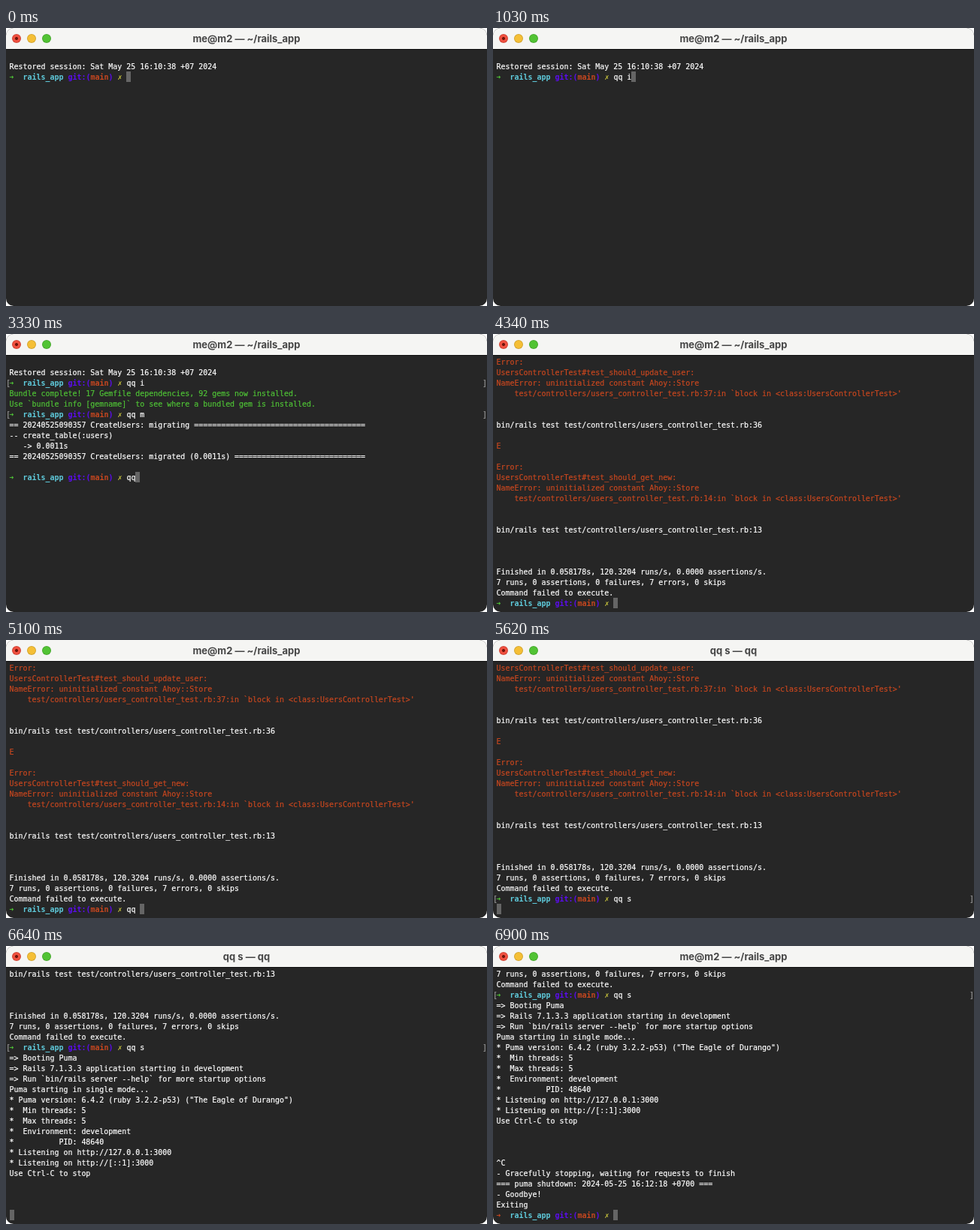
Recreate the animation shown at these times as an HTML page. Size 640 by 371 pixels, loop 7.16 s.

```html
<!DOCTYPE html>
<html lang="en">
<head>
<meta charset="utf-8">
<title>Terminal</title>
<style>
  html, body { margin: 0; width: 100%; height: 100%; overflow: hidden; background: #fff; }
  .window {
    position: relative; width: 640px; height: 371px; overflow: hidden;
    border-radius: 10px; background: #262626;
  }
  .bar {
    position: absolute; inset: 0 0 auto; height: 28px;
    background: #f5f5f3; border-bottom: 1px solid #0c0c0c;
  }
  .title {
    font: 700 13px/28px Inter, sans-serif; color: #454545;
    text-align: center; white-space: pre;
  }
  .light {
    position: absolute; top: 8px; width: 12px; height: 12px; box-sizing: border-box;
    border: 1px solid rgba(0, 0, 0, .13); border-radius: 50%;
  }
  .close { left: 8px; background: radial-gradient(circle, #70150c 1.6px, #f0503f 2.4px); }
  .min { left: 28px; background: #f5bf36; }
  .max { left: 48px; background: #52c334; }
  .screen {
    position: absolute; left: 4.5px; top: 30px; width: 630.5px; height: 336px;
    font: 9.966px/16px "DejaVu Sans Mono", monospace; color: #fff; white-space: pre;
    -webkit-text-stroke: .2px;
  }
  .row { position: relative; height: 14px; }
  .ran::before, .ran::after { position: absolute; top: 0; color: #999; }
  .ran::before { content: "["; left: -4.5px; }
  .ran::after { content: "]"; right: -5px; }
  .cursor {
    display: inline-block; width: 6px; height: 14px;
    background: #656565; vertical-align: top;
  }
  b { -webkit-text-stroke: 0; }
  b i { display: inline-block; width: 6px; font-style: normal; }
  .green { color: #4fc236; }
  .red { color: #c8471f; }
  .cyan { color: #5fcbdc; }
  .blue { color: #5c0cf0; }
  .yellow { color: #c9c53c; }
</style>
</head>
<body>
<div class="window">
  <div class="bar">
    <span class="light close"></span><span class="light min"></span><span class="light max"></span>
    <div class="title"></div>
  </div>
  <div class="screen"></div>
</div>
<script>
const LOOP = 7160, ROWS = 24, HOME = "me@m2 — ~/rails_app";
const titleEl = document.querySelector(".title");
const screenEl = document.querySelector(".screen");

const states = [];
const lines = [];
let title = HOME, input = "";

const span = (color, text) => `<span class="${color}">${text}</span>`;
const row = (html, cls = "") => `<div class="row ${cls}">${html}</div>`;
const escapeHtml = s => s.replace(/&/g, "&amp;").replace(/</g, "&lt;");

function print(text, color = "") {
  for (const line of text.split("\n")) lines.push(row(span(color, escapeHtml(line))));
}

function prompt(arrow = "green") {
  title = HOME;
  input = `<b>${span(arrow, "<i>➜</i>")}  ${span("cyan", "rails_app")} ${span("blue", "git:(")}` +
    `${span("red", "main")}${span("blue", ")")} ${span("yellow", "<i>✗</i>")}</b> `;
}

// Store what the screen shows from time t on
function show(t, typed = "") {
  const all = [...lines, row(input + typed + '<span class="cursor"></span>')];
  states.push({ t, title, html: all.slice(-ROWS).join("") });
}

function type(...keys) {
  for (const [t, typed] of keys) show(t, typed);
}

function run(t, cmd) {
  lines.push(row(input + cmd, "ran"));
  input = "";
  title = cmd + " — qq";
  show(t);
}

function testError(name, line) {
  print(`Error:
UsersControllerTest#${name}:
NameError: uninitialized constant Ahoy::Store
    test/controllers/users_controller_test.rb:${line}:in \`block in <class:UsersControllerTest>'`, "red");
  print(`\n\nbin/rails test test/controllers/users_controller_test.rb:${line - 1}\n`);
}

print("\nRestored session: Sat May 25 16:10:38 +07 2024");
prompt();
type([0, ""], [250, "q"], [510, "qq"], [760, "qq "], [1020, "qq i"]);
run(1290, "qq i");
print("Bundle complete! 17 Gemfile dependencies, 92 gems now installed.\n" +
  "Use `bundle info [gemname]` to see where a bundled gem is installed.", "green");
prompt();
type([1540, ""], [1790, "q"], [2050, "qq"], [2300, "qq m"]);

run(2560, "qq m");
const migration = "== 20240525090357 CreateUsers: ";
print(`${migration}migrating ${"=".repeat(38)}
-- create_table(:users)
   -> 0.0011s
${migration}migrated (0.0011s) ${"=".repeat(29)}
`);
prompt();
type([2810, ""], [3070, "q"], [3330, "qq"], [3580, "qq "], [3830, "qq t"]);

run(4090, "qq t");
testError("test_should_update_user", 37);
print("E\n", "red");
testError("test_should_get_new", 14);
print(`

Finished in 0.058178s, 120.3204 runs/s, 0.0000 assertions/s.
7 runs, 0 assertions, 0 failures, 7 errors, 0 skips
Command failed to execute.`);
prompt();
type([4340, ""], [4600, "q"], [4850, "qq"], [5100, "qq "], [5360, "qq s"]);

run(5620, "qq s");
print(`=> Booting Puma
=> Rails 7.1.3.3 application starting in development
=> Run \`bin/rails server --help\` for more startup options`);
show(5880);
print(`Puma starting in single mode...
* Puma version: 6.4.2 (ruby 3.2.2-p53) ("The Eagle of Durango")
*  Min threads: 5
*  Max threads: 5
*  Environment: development
*          PID: 48640
* Listening on http://127.0.0.1:3000
* Listening on http://[::1]:3000
Use Ctrl-C to stop
`);
show(6130);
print("");
show(6380);
print("");
show(6640);
print(`^C
- Gracefully stopping, waiting for requests to finish
=== puma shutdown: 2024-05-25 16:12:18 +0700 ===
- Goodbye!
Exiting`);
prompt("red");
show(6900);

const start = performance.now();
let current;

function draw() {
  const t = Math.max(0, performance.now() - start) % LOOP;
  const state = states.findLast(s => s.t <= t);
  if (state !== current) {
    current = state;
    titleEl.textContent = state.title;
    screenEl.innerHTML = state.html;
  }
  requestAnimationFrame(draw);
}
draw();
</script>
</body>
</html>
```
